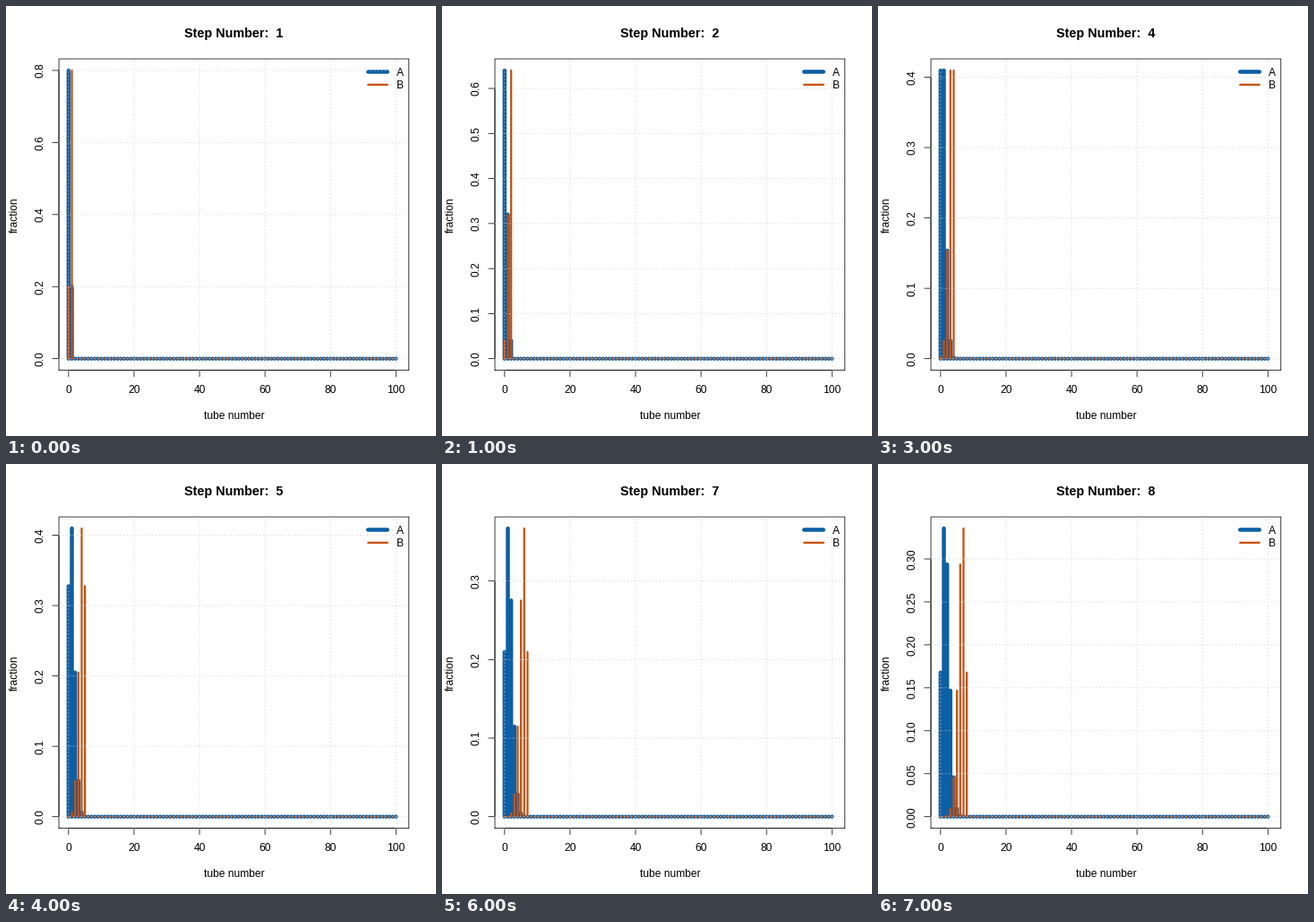
Recreate the animation shown at these times as a matplotlib script. Size 480 by 480 pixels, loop 8000 ms.

```python
import math

import matplotlib.pyplot as plt
from matplotlib.animation import FuncAnimation
from matplotlib.collections import LineCollection

SIZE, DPI = 480, 72
STEPS, TUBES = 8, 100
BLUE, ORANGE, GRID = "#0b5fa5", "#c8500a", "#d3d3d3"
LEFT, RIGHT, TOP, BOTTOM = 59.04, 449.76, 59.04, 406.56
LINE = 14.4  # margin line height
MID_X, MID_Y = (LEFT + RIGHT) / 2, (TOP + BOTTOM) / 2

plt.rcParams["font.family"] = "Liberation Sans"
fig = plt.figure(figsize=(SIZE / DPI, SIZE / DPI), dpi=DPI, facecolor="white")
ax = fig.add_axes([0, 0, 1, 1])


def x_pos(tube):
    # the axis covers 1..100 with 4 % padding on each side
    return LEFT + (tube - 1 + 3.96) * (RIGHT - LEFT) / (99 * 1.08)


def y_pos(value, top):
    return BOTTOM - (value / top + 0.04) * (BOTTOM - TOP) / 1.08


def segments(segs, color, width, **style):
    style.setdefault("capstyle", "round")
    lines = LineCollection(segs, colors=color, linewidths=width, **style)
    lines.set_snap(False)
    ax.add_collection(lines, autolim=False)


def label(x, y, text, size=12, **style):
    style.setdefault("ha", "center")
    ax.text(x, y, text, fontsize=size, va="baseline",
            rotation_mode="anchor", **style)


def fractions(n, p):
    return [math.comb(n, k) * p**k * (1 - p) ** (n - k) for k in range(TUBES + 1)]


def tick_values(top):
    cell = top * 1.08 / 5
    unit = 0.02
    for bigger in (0.05, 0.1, 0.2):
        bias = 1.7 if bigger == 0.05 else 0.8
        if bigger - cell < bias * (cell - unit):
            unit = bigger
    digits = 2 if unit < 0.1 else 1
    count = int(top / unit + 1e-9)
    return [i * unit for i in range(count + 1)], digits


def draw_bars(values, top, color, width):
    base = y_pos(0, top)
    segments([[(x_pos(k), base), (x_pos(k), min(y_pos(v, top), base - 0.01))]
              for k, v in enumerate(values)], color, width)


def draw_axes(x_ticks, y_ticks, digits, top):
    xs = [x_pos(t) for t in x_ticks]
    ys = [y_pos(t, top) for t in y_ticks]
    corners = [(LEFT, BOTTOM), (RIGHT, BOTTOM), (RIGHT, TOP), (LEFT, TOP), (LEFT, BOTTOM)]
    segs = [corners]
    segs += [[(xs[0], BOTTOM), (xs[-1], BOTTOM)], [(LEFT, ys[0]), (LEFT, ys[-1])]]
    segs += [[(x, BOTTOM), (x, BOTTOM + 7.2)] for x in xs]
    segs += [[(LEFT, y), (LEFT - 7.2, y)] for y in ys]
    segments(segs, "black", 0.75)
    for x, t in zip(xs, x_ticks):
        label(x, BOTTOM + 1.8 * LINE, str(t))
    for y, t in zip(ys, y_ticks):
        label(LEFT - 1.2 * LINE, y, f"{t:.{digits}f}", rotation=90)
    return xs, ys


def draw_legend():
    rows = (("A", BLUE, 4.5), ("B", ORANGE, 2.25))
    for i, (name, color, width) in enumerate(rows, 1):
        y = TOP + i * LINE
        segments([[(404.2, y), (425.8, y)]], color, width)
        label(436.4, y + 4.3, name, ha="left")


def draw_grid(xs, ys):
    segs = [[(x, BOTTOM), (x, TOP)] for x in xs]
    segs += [[(LEFT, y), (RIGHT, y)] for y in ys]
    segments(segs, GRID, 0.75, linestyles=[(0, (1 / 0.75, 3 / 0.75))])


def draw(frame):
    step = frame + 1
    ax.clear()
    ax.set(xlim=(0, SIZE), ylim=(SIZE, 0))
    ax.axis("off")

    slow, fast = fractions(step, 0.2), fractions(step, 0.8)
    top = max(slow)
    draw_bars(slow, top, BLUE, 4.5)
    draw_bars(fast, top, ORANGE, 2.25)
    y_ticks, digits = tick_values(top)
    xs, ys = draw_axes(range(0, TUBES + 1, 20), y_ticks, digits, top)
    draw_legend()
    draw_grid(xs, ys)

    label(MID_X, 34.7, f"Step Number:  {step}", 14.4, weight="bold")
    label(MID_X, BOTTOM + 3.8 * LINE, "tube number")
    label(LEFT - 3.2 * LINE, MID_Y, "fraction", rotation=90)
    return []


anim = FuncAnimation(fig, draw, frames=STEPS, interval=1000, repeat=True, repeat_delay=0)
plt.show()
```
